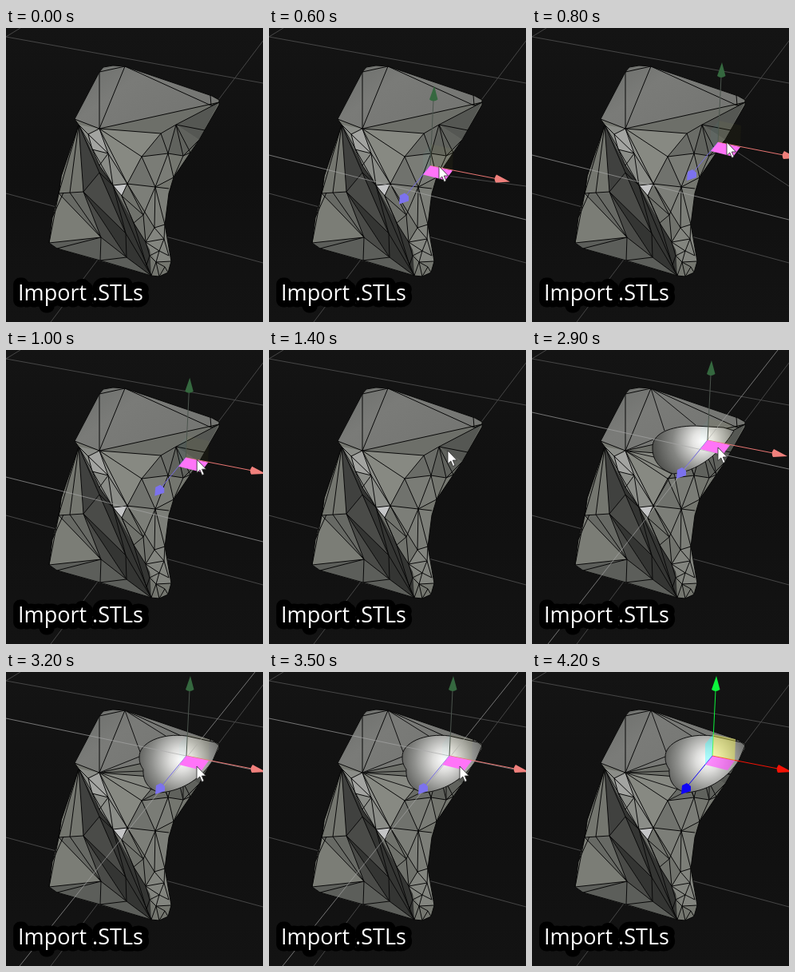
Write an HTML page that moves like this. It is 322 px wide and 368 px high and loops after 4300 ms.

```html
<!DOCTYPE html>
<html lang="en">
<head>
<meta charset="utf-8">
<title>Import .STLs</title>
<style>
html, body { margin: 0; width: 100%; height: 100%; overflow: hidden; background: #111; }
svg { display: block; }
text { font: 27px "Open Sans", "Noto Sans", sans-serif; fill: #fff; stroke: #000; stroke-width: 17px; stroke-linejoin: round; paint-order: stroke; }
#gizmo { --x: #f51205; --y: #0cf53c; --z: #1005f5; --xl: #f51205; --yl: #0cf53c; --zl: #1005f5; --flat: .42; }
#gizmo.held { --x: #f0807c; --y: #35683f; --z: #7c72ee; --xl: #e87572; --yl: #4c554e; --zl: #756be0; --flat: .03; }
#gizmo.held #pad { fill: #ff74f8; fill-opacity: 1; }
</style>
</head>
<body>
<svg width="322" height="368" viewBox="0 0 322 368">
  <defs>
    <linearGradient id="floor" x2="0" y2="1">
      <stop stop-color="#141414"/><stop offset=".5" stop-color="#101010"/><stop offset="1" stop-color="#131313"/>
    </linearGradient>
    <linearGradient id="lid" x2="1" y2=".6">
      <stop stop-color="#6c6e6b"/><stop offset=".4" stop-color="#7a7b78"/><stop offset="1" stop-color="#747572"/>
    </linearGradient>
    <radialGradient id="bowlA" gradientUnits="userSpaceOnUse" cx="214" cy="114" r="64">
      <stop stop-color="#fff"/><stop offset=".2" stop-color="#e4e4e2"/><stop offset=".6" stop-color="#848582"/><stop offset="1" stop-color="#4c4d4a"/>
    </radialGradient>
    <radialGradient id="bowlB" gradientUnits="userSpaceOnUse" cx="220" cy="110" r="58">
      <stop stop-color="#fff"/><stop offset=".25" stop-color="#dededc"/><stop offset=".65" stop-color="#8f908d"/><stop offset="1" stop-color="#555653"/>
    </radialGradient>
  </defs>

  <rect width="322" height="368" fill="url(#floor)"/>
  <path stroke="#464646" d="M0 11L322 69M0 11L18 0M322 16L56 368M0 207L322 294"/>

  <!-- facets -->
  <path fill="#74766f" d="M117 55L122 49 134 47 149 48 258 85 267 90 267 96 242 140 231 156 210 187 204 207 199 246 207 292 203 306 192 311 182 310 118 291 64 276 54 269 58 237 66 207 69 186 91 121 86 114Z"/>
  <path fill="url(#lid)" d="M86 114L117 55 122 49 134 47 149 48 258 85 267 92 117 126Z"/>
  <path fill="#6d6f69" d="M117 126L267 93 213 121 194 132Z"/>
  <path fill="#555753" d="M213 121L267 93 242 140Z"/>
  <path fill="#60625d" d="M213 121L242 140 231 156 222 160 203 157Z"/>
  <path fill="#878982" d="M117 126L194 132 170 161 152 195Z"/>
  <path fill="#6a6c67" d="M170 161L194 132 213 121 203 157Z"/>
  <path fill="#7a7c76" d="M170 161L203 157 210 187 187 199Z"/>
  <path fill="#70726d" d="M152 195L170 161 187 199Z"/>
  <path fill="#7c7e78" d="M152 195L187 199 204 201 199 246 186 250Z"/>
  <path fill="#5c5e5a" d="M54 269L119 262 151 287 182 310 64 276Z"/>
  <path fill="#7b7d76" d="M66 207L54 269 119 262Z"/>
  <path fill="#676964" d="M66 207L97 205 119 262Z"/>
  <path fill="#40413f" d="M91 121L117 181 97 205Z"/>
  <path fill="#343533" d="M91 121L134 197 180 275 182 310 151 287 97 205 117 181Z"/>
  <path fill="#4a4b48" d="M97 205L151 287 119 262ZM117 181L150 257 97 205Z"/>
  <path fill="#8b8d88" d="M91 121L117 126 152 195 134 197 117 172Z"/>
  <path fill="#a3a4a1" d="M103 133L117 126 128 157 108 152Z"/>
  <path fill="#c4c5c6" d="M134 197L152 195 145 210Z"/>
  <path fill="#70726c" d="M134 197L145 210 152 195 186 250 175 268 160 244Z"/>
  <path fill="#83857f" d="M186 250L199 246 207 292 188 293 175 268Z"/>

  <!-- wireframe -->
  <g fill="none" stroke="#080808" stroke-linejoin="round">
    <path d="M86 114L117 55 122 49 134 47 149 48 258 85 267 90 267 96 242 140 231 156 210 187 204 207 199 246 207 292 203 306 192 311 182 310 118 291 64 276 54 269 58 237 66 207 69 186 91 121Z"/>
    <path d="M117 55L117 126 149 48 117 55M149 48L257 97 267 93M256 84L257 97M86 114L117 126 267 93M117 126L194 132 213 121 267 93"/>
    <path d="M213 121L249 128M213 121L231 156M213 121L222 160 242 140M213 121L203 157 194 132 170 161 117 126 152 195 170 161 203 157 222 160 231 156M170 161L187 199 152 195M187 199L203 157 210 187 187 199 204 201M222 160L210 187"/>
    <path d="M91 121L103 133 117 126M103 133L108 152 128 157 103 133M108 152L117 172 128 157 117 126M128 157L134 197 117 172M128 157L152 195 134 197 145 210 152 195M91 121L134 197"/>
    <path d="M91 121L66 207 97 205 91 121 80 206M91 121L117 181 97 205M69 186L66 207 54 269 119 262 66 207M80 206L119 262 97 205 151 287 119 262M97 205L150 257 117 181 134 197 150 257 151 287 118 291M119 262L118 291M119 262L64 276M150 257L182 310 151 287M134 197L182 310M58 237L72 206"/>
    <path d="M145 210L160 244 172 234 152 195 186 250 187 199 199 246 186 250 175 268 160 244 145 210 172 234 175 268M187 199L172 234"/>
    <path d="M175 268L198 264 186 250M199 246L198 264 192 279 175 268 180 285 192 279 204 285 198 264M180 285L188 293 192 279M188 293L207 292M188 293L182 310 176 297 180 285M188 293L192 311 199 299 188 293M199 299L203 306M160 244L176 297"/>
  </g>

  <!-- spherical cuts -->
  <g id="cutA" stroke="#111">
    <path fill="none" d="M149 48L166 101M117 126L152 112M117 126L153 134M117 126L175 155M149 48L205 94M175 155L152 195M178 154L187 199M200 148L203 157M226 130L231 156"/>
    <path fill="url(#bowlA)" d="M151 123C150 105 172 95 205 95L240 97 253 101C242 120 215 151 177 155C158 149 151 136 151 123Z"/>
  </g>
  <g id="cutB" stroke="#111">
    <path fill="none" d="M149 48L168 100M117 126L167 106M117 126L172 124M117 126L186 148M149 48L200 80M170 161L190 151M200 150L203 157M222 140L222 160M237 128L249 128"/>
    <path fill="url(#bowlB)" d="M167 107C166 88 196 76 226 80L262 88 267 92 259 111C246 131 224 148 194 151C179 148 171 137 172 122C168 116 167 112 167 107Z"/>
  </g>

  <g stroke="#aaa" stroke-opacity=".65">
    <path id="guide0" d="M0 159L322 240"/>
    <path id="guideA" d="M0 78L322 149M308 0L20 368"/>
    <path id="guideB" d="M0 58L322 125M312 0L17 368"/>
  </g>
  <path id="tether" stroke="#484848"/>

  <g id="gizmo">
    <path stroke="var(--yl)" d="M0 0L4 -82"/>
    <path stroke="var(--xl)" d="M0 0L82 16"/>
    <path stroke="var(--zl)" d="M0 0L-33 40"/>
    <g style="fill-opacity:var(--flat)">
      <path fill="#ffff50" d="M0 0L28 6 29 -21 1 -27Z"/>
      <path fill="#40ffff" d="M0 0L1 -27 -9 -15 -9 11Z"/>
      <path id="pad" fill="#ff50ff" fill-opacity=".65" d="M0 0L28 6 19 18 -9 11Z"/>
    </g>
    <path fill="var(--y)" d="M5 -100L9.500 -83Q4 -79 -1 -83Z"/>
    <path fill="var(--x)" d="M100 20L82 21Q79 16 83 11Z"/>
    <path fill="var(--z)" d="M-39 48L-38 37 -32 34 -27 38 -27 44Z"/>
  </g>

  <path id="cursor" fill="#fff" stroke="#222" stroke-width=".8" d="M0 0V16.500L3.800 13 6.500 19.500 9 18.300 6.300 12H11.500Z"/>
  <text x="15" y="341">Import .STLs</text>
</svg>

<script>
const el = id => document.getElementById(id);
const show = (id, on) => el(id).style.display = on ? "" : "none";

// keys: [time, x, y], joined by straight motion
const gizmoKeys = [[400, 171, 202], [800, 233, 143], [900, 230, 138], [1300, 211, 125], [2500, 211, 125], [2900, 220, 113], [3100, 226, 105]];
const cursorKeys = [[400, 182, 203], [800, 244, 143], [900, 243, 140], [1400, 224, 126], [1800, 224, 126], [2000, 224, 138], [2500, 224, 138], [2900, 233, 122], [3100, 239, 118], [3900, 239, 118], [4200, 275, 146]];

function at(keys, t) {
  const i = keys.findIndex(k => k[0] >= t);
  if (i < 0) return keys[keys.length - 1].slice(1);
  if (!i) return keys[0].slice(1);
  const [t0, x0, y0] = keys[i - 1], [t1, x1, y1] = keys[i];
  const k = (t - t0) / (t1 - t0);
  return [x0 + (x1 - x0) * k, y0 + (y1 - y0) * k];
}

function draw(now) {
  const t = Math.floor(now % 4300 / 100) * 100;
  const within = (a, b) => t >= a && t < b;
  const [x, y] = at(gizmoKeys, t);
  el("gizmo").setAttribute("transform", `translate(${x} ${y})`);
  el("gizmo").setAttribute("class", within(400, 1400) || within(2100, 4000) ? "held" : "");
  el("cursor").setAttribute("transform", `translate(${at(cursorKeys, t)})`);
  el("tether").setAttribute("d", `M${x + 25} ${y + 13}L322 198`);
  show("gizmo", within(400, 1400) || t >= 1800);
  show("cursor", within(400, 4200));
  show("tether", within(400, 1000));
  show("guide0", within(200, 1400));
  show("guideA", within(2100, 3200));
  show("guideB", within(3200, 4000));
  show("cutA", within(1800, 3200));
  show("cutB", t >= 3200);
}

const start = performance.now();
function tick() {
  draw(performance.now() - start);
  requestAnimationFrame(tick);
}
tick();
</script>
</body>
</html>
```
